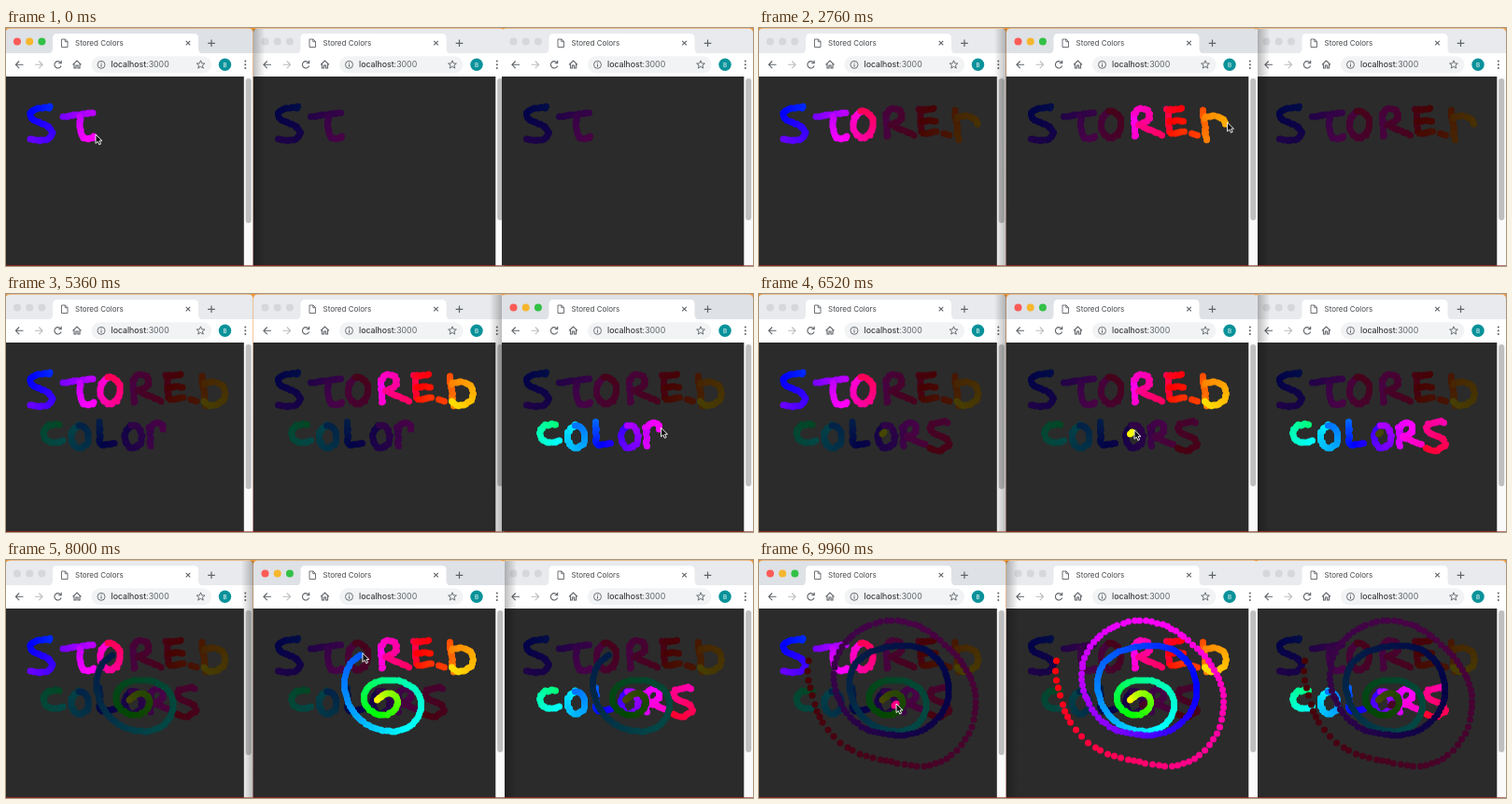
Recreate the animation shown at these times as an HTML page. Size 800 px wide and 255 px high, loop 10000 ms.

```html
<!DOCTYPE html>
<html lang="en">
<head>
<meta charset="utf-8">
<title>Stored Colors</title>
<style>
html, body { margin: 0; width: 100%; height: 100%; overflow: hidden; background: #b5301f; }
svg { display: block; width: 800px; height: 255px; }
text { font-family: Inter, Roboto, sans-serif; }
</style>
</head>
<body>
<svg id="stage" viewBox="0 0 800 255">
  <defs>
    <linearGradient id="desk" x2="0" y2="1">
      <stop stop-color="#ee9a3a"/><stop offset="1" stop-color="#c0261c"/>
    </linearGradient>
    <linearGradient id="shadeR"><stop stop-opacity=".26"/><stop offset="1" stop-opacity="0"/></linearGradient>
    <linearGradient id="shadeL"><stop stop-opacity="0"/><stop offset="1" stop-opacity=".26"/></linearGradient>
  </defs>
  <rect width="800" height="255" fill="url(#desk)"/>
  <g id="desktop"></g>
  <path id="cursor" d="M0 0V9.6L2.3 7.6L3.8 11L5.6 10.2L4.1 6.9H7Z" fill="#111" stroke="#fff" stroke-width=".9"/>
</svg>
<script>
const LOOP = 10000, NS = 'http://www.w3.org/2000/svg';
const desktop = document.getElementById('desktop');
const cursor = document.getElementById('cursor');
const LEFT = [0, 265.5, 531.5], WIDTH = [264.5, 268.5, 268.5];
const LIGHTS = ['#fc5b57', '#f6b62d', '#32c146'];

// Stacking, back to front; the last window has focus.
const FOCUS = [
  [0, [1, 2, 0]], [1000, [2, 0, 1]], [3120, [0, 1, 2]],
  [6200, [0, 2, 1]], [9840, [2, 1, 0]]
];

function make(tag, attrs, parent) {
  const el = document.createElementNS(NS, tag);
  for (const k in attrs) el.setAttribute(k, attrs[k]);
  if (parent) parent.append(el);
  return el;
}

function buildWindow(i) {
  const w = WIDTH[i], d = w - WIDTH[0];
  const g = make('g', { transform: `translate(${LEFT[i]} 0)` }, desktop);
  g.innerHTML = `
    <g class="shade">
      <rect x="${w}" y="1" width="13" height="253" fill="url(#shadeR)"/>
      <rect x="-13.5" y="1" width="13" height="253" fill="url(#shadeL)"/>
    </g>
    <path class="strip" d="M-.5 28V5.5Q-.5 .5 4.5 .5H${w - 5}Q${w} .5 ${w} 5.5V28Z"/>
    <path d="M45 27.5Q50 27 50 22V11Q50 6 55 6H201Q206 6 206 11V22Q206 27 211 27.5Z" fill="#fff"/>
    <rect x="-.5" y="27" width="${w + .5}" height="25" fill="#fff"/>
    <rect x="-.5" y="52" width="${w + .5}" height="202.4" fill="#2b2b2b"/>
    <rect x="${w - 9.7}" y="52" width="9.7" height="202.4" fill="#fafafa"/>
    <rect x="${w - 7.8}" y="54" width="6" height="${i ? 152 : 155}" rx="3" fill="#bfbfbf"/>
    ${LIGHTS.map((_, k) => `<circle class="light" cx="${12 + 13.2 * k}" cy="14.5" r="4"/>`).join('')}
    <g fill="none" stroke="#5f6368" stroke-width="1.1">
      <path d="M59.5 12H63.5L66 14.5V20.5H59.5ZM63.3 12V14.7H66" stroke-width=".9"/>
      <path d="M192.7 13.8L197.3 18.4M197.3 13.8L192.7 18.4"/>
      <path d="M216.2 16.3H223.8M220 12.5V20.1" stroke-width="1.2"/>
      <path d="M18.5 39.3H10.5M14.2 35.5L10.4 39.3L14.2 43.1"/>
      <path d="M31 39.3H39M35.3 35.5L39.1 39.3L35.3 43.1" stroke="#bbbdc0"/>
      <path d="M58.5 37A3.7 3.7 0 1 0 59.1 40.5M59.2 34.8V37.7H56.2"/>
      <path d="M71.5 39.3L76 35L80.5 39.3M73 38.5V43H75V40H77V43H79V38.5"/>
    </g>
    <text x="74" y="19.3" font-size="8" fill="#45484c">Stored Colors</text>
    <rect x="91.5" y="30.3" width="${128.5 + d}" height="18" rx="9" fill="#f1f3f4"/>
    <circle cx="102" cy="39.3" r="4" fill="none" stroke="#5f6368" stroke-width=".9"/>
    <path d="M102 38.7V41.6M102 36.8V37.7" stroke="#5f6368"/>
    <text x="112.5" y="42.4" font-size="8.8" fill="#202124">localhost<tspan fill="#5f6368">:3000</tspan></text>
    <g transform="translate(${d} 0)">
      <path d="M208.5 34.8L209.7 37.8L212.9 38L210.4 40L211.3 43.1L208.5 41.4L205.7 43.1L206.6 40L204.1 38L207.3 37.8Z"
        fill="none" stroke="#5f6368" stroke-width=".9"/>
      <circle cx="234.5" cy="39.3" r="6.7" fill="#09929a"/>
      <text x="234.5" y="41.6" font-size="6.3" fill="#fff" text-anchor="middle">B</text>
      ${[35.5, 39.3, 43.1].map(y => `<circle cx="256.3" cy="${y}" r="1" fill="#5f6368"/>`).join('')}
    </g>`;
  return {
    g, ink: make('g', {}, g), dots: [],
    shade: g.querySelector('.shade'), strip: g.querySelector('.strip'),
    lights: [...g.querySelectorAll('.light')]
  };
}

const wins = LEFT.map((_, i) => buildWindow(i));
const dots = [];

let seed = 7;
const random = () => (seed = seed * 16807 % 2147483647) / 2147483647;

// Pointer samples land on whole pixels.
function addDot(win, t, hue, x, y) {
  dots.push({ win, t, hue, x: Math.round(x), y: Math.round(y) });
}

// Pen strokes in a box of about 30 by 36
const GLYPHS = {
  S: 'M24 0Q1 0 2 8Q4 15 16 18Q30 24 23 32Q14 38 2 34',
  T: 'M0 10L33 6M18 8Q18 24 21 32Q26 36 33 31',
  O: 'M13 4Q2 8 3 20Q6 34 15 33Q26 28 24 14Q20 3 12 5',
  R: 'M1 8Q2 20 2 33M1 8Q8 -3 17 4Q21 14 6 19L30 29',
  E: 'M0 3L2 28M0 3L16 1M1 15L17 14M2 28L19 26M25 28L31 29',
  D: 'M1 3L5 36M1 13Q10 6 22 12Q29 20 22 31Q12 39 4 31',
  C: 'M22 4Q2 0 2 15Q4 31 26 24',
  L: 'M4 0L6 29L24 27'
};

function write(win, text, { x, y, size, pitch, t, beat, hue, turn }) {
  [...text].forEach((ch, i) => {
    const path = make('path', { d: GLYPHS[ch] }), len = path.getTotalLength();
    const n = Math.ceil(len * size / 2.4);
    for (let j = 0; j <= n; j++) {
      const k = j / n, p = path.getPointAtLength(len * k);
      const wobble = random() * 1.4 - .7;
      addDot(win, t + beat * (i + .85 * k), hue + turn * (i + .9 * k),
        x + pitch * i + p.x * size + wobble, y + p.y * size + wobble);
    }
  });
}

const upper = { y: 85, size: 1, pitch: 37, beat: 660, turn: 38 };
write(0, 'STO', { ...upper, x: 24, t: -1225, hue: 230 });
write(1, 'RED', { ...upper, x: 135, t: 1070, hue: 302 });
write(2, 'COLORS', { x: 39, y: 137, size: .85, pitch: 28.5, t: 3350, beat: 450, hue: 148, turn: 34 });

// Spiral radius at every eighth of a turn, starting at the left
const RADII = [
  8, 5, 6, 10, 14, 15, 16, 18, 22, 22, 21, 27, 39, 39, 33, 33, 40, 53,
  57, 67, 62, 47, 37, 41, 54, 75, 85, 84, 92, 88, 66, 69, 82, 106
];

function radius(s) {
  const i = Math.floor(s), f = s - i;
  const [a, b, c, d] = [-1, 0, 1, 2].map(o => RADII[Math.max(0, Math.min(RADII.length - 1, i + o))]);
  return b + f / 2 * (c - a + f * (2 * a - 5 * b + 4 * c - d + f * (3 * (b - c) + d - a)));
}

function drawSpiral(end) {
  for (let s = 0; s < end;) {
    const k = s / end, r = radius(s), angle = Math.PI * (1 + s / 4);
    addDot(1, 6500 + 3280 * k ** 1.24, 58 + 302 * k,
      140 + r * Math.cos(angle), 150 + r * Math.sin(angle));
    // The hand speeds up, so the dots spread out.
    const gap = (2.6 + 6 * k ** 3) * (.75 + .5 * random());
    s += gap / (Math.max(r, 8) * Math.PI / 4);
  }
}
drawSpiral(32.65);

for (let i = 0; i < 3; i++) addDot(0, 9920 + 20 * i, 326 + 2 * i, 147 - i, 154 + i);

for (const dot of dots) {
  wins.forEach((win, i) => {
    win.dots.push(make('circle', {
      cx: dot.x, cy: dot.y, r: 3.5, display: 'none',
      fill: `hsl(${dot.hue % 360} ${i === dot.win ? '100% 50%' : '92% 14.5%'})`
    }, win.ink));
  });
}

let shown = 0, phase = -1;

function setFocus(p) {
  if (p === phase) return;
  phase = p;
  FOCUS[p][1].forEach((i, rank) => {
    const win = wins[i], on = rank === 2;
    desktop.append(win.g);
    win.shade.setAttribute('display', on ? 'inline' : 'none');
    win.strip.setAttribute('fill', on ? '#dee1e6' : '#e8eaed');
    win.lights.forEach((l, k) => l.setAttribute('fill', on ? LIGHTS[k] : '#d5d7da'));
  });
}

function showDots(n) {
  const lo = Math.min(n, shown), hi = Math.max(n, shown);
  for (const win of wins)
    for (let i = lo; i < hi; i++) win.dots[i].setAttribute('display', i < n ? 'inline' : 'none');
  shown = n;
}

function moveCursor(t, n) {
  const a = dots[n - 1], b = dots[n] || a, from = Math.max(a.t, 0);
  const f = b.t > from ? (t - from) / (b.t - from) : 0;
  const k = f * f * (3 - 2 * f);
  const ax = a.x + LEFT[a.win], bx = b.x + LEFT[b.win];
  cursor.setAttribute('transform',
    `translate(${ax + (bx - ax) * k + 2} ${a.y + (b.y - a.y) * k - 2})`);
}

function render(t) {
  let n = dots.findIndex(d => d.t > t);
  if (n < 0) n = dots.length;
  setFocus(FOCUS.filter(f => f[0] <= t).length - 1);
  showDots(n);
  moveCursor(t, n);
}

const start = performance.now();
function tick(now) {
  render(Math.max(0, now - start) % LOOP);
  requestAnimationFrame(tick);
}
render(0);
requestAnimationFrame(tick);
</script>
</body>
</html>
```
